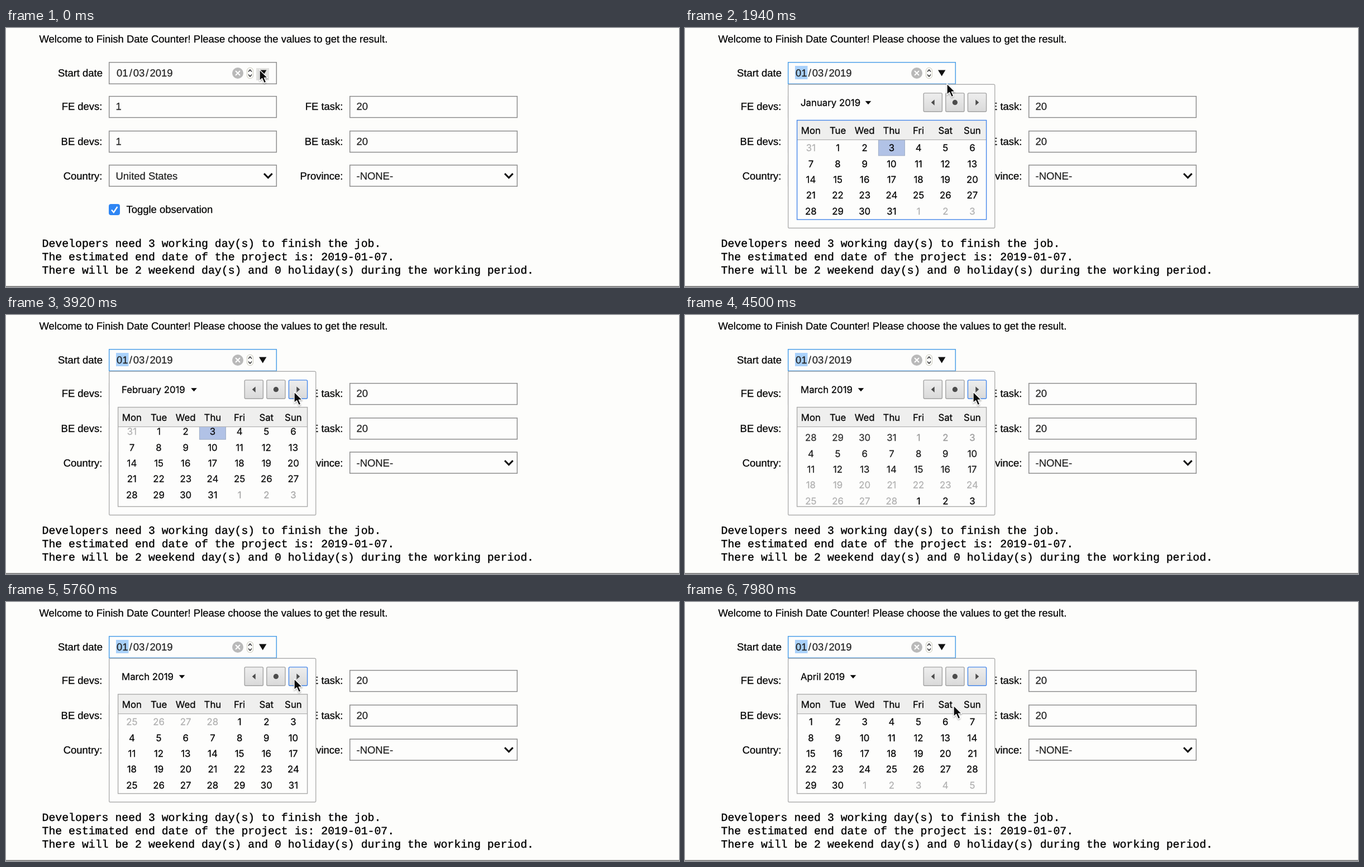
Recreate the animation shown at these times as an HTML page. Size 1205x465 px, loop 8 s.

```html
<!DOCTYPE html>
<html lang="en">
<head>
<meta charset="utf-8">
<title>Finish Date Counter</title>
<style>
  html, body { margin: 0; width: 100%; height: 100%; overflow: hidden; background: #fdfdfb; }
  svg { display: block; width: 1205px; height: 465px; color: #000; }
  text {
    font: 18.44px "Liberation Sans", Arial, sans-serif; text-rendering: geometricPrecision; white-space: pre;
    fill: currentColor; stroke: currentColor; stroke-width: .25px;
  }
  .value { color: #222; }
  .mono text { font: 19.83px "Liberation Mono", "Courier New", monospace; stroke-width: .4px; }
  .popup text { font: 16.8px Inter, sans-serif; }
  .mid { text-anchor: middle; }
  .end { text-anchor: end; }
  .box { fill: #fdfdfc; stroke: #8e8e8e; stroke-width: 1.5; }
  .button { fill: url(#face); stroke: #a3a3a3; stroke-width: 1.4; }
  .chevron { fill: none; stroke: #111; stroke-width: 3; }
</style>
</head>
<body>
<svg id="stage" viewBox="0 0 1205 465">
  <defs>
    <linearGradient id="face" x2="0" y2="1">
      <stop stop-color="#eeeeee"/><stop offset="1" stop-color="#d9d9d9"/>
    </linearGradient>
    <clipPath id="window"><rect x="201" y="201" width="338.5" height="142.5"/></clipPath>
    <filter id="shadow" x="-50%" y="-50%" width="200%" height="200%">
      <feDropShadow dx="0" dy="1.5" stdDeviation="1.3" flood-opacity=".35"/>
    </filter>
  </defs>

  <text x="59.5" y="25.5">Welcome to Finish Date Counter! Please choose the values to get the result.</text>
  <g id="form"></g>

  <rect id="dateBox" class="box" x="184.7" y="61.7" width="299.6" height="38.6"/>
  <rect id="mark" x="197" y="68" width="22.5" height="24" fill="#a9d1fb"/>
  <g class="value">
    <text x="198" y="86.5">01</text><text x="220.7" y="86.5">/</text>
    <text x="227.8" y="86.5">03</text><text x="250.3" y="86.5">/</text>
    <text x="257.4" y="86.5">2019</text>
  </g>
  <circle cx="415" cy="81" r="10" fill="#b9b9b9"/>
  <path d="M411 77l8 8m0-8l-8 8" stroke="#fff" stroke-width="2"/>
  <rect x="431.7" y="71.5" width="10.6" height="19" rx="4.5" fill="#fff" stroke="#c6c6b4"/>
  <path d="M434 78.5l3-3.5 3 3.5m-6 5l3 3.5 3-3.5" fill="none" stroke="#333" stroke-width="1.5"/>
  <rect id="hover" x="448" y="72" width="23" height="22" fill="#e2e2e0"/>
  <path d="M453 75.5h13.4l-6.7 11z" fill="#111"/>

  <rect x="184" y="316" width="20" height="20" rx="4" fill="#2f86f3"/>
  <path d="M189 326.5l3.8 4.5 6.6-10" fill="none" stroke="#fff" stroke-width="2.3"/>
  <text x="215.5" y="332">Toggle observation</text>

  <g class="mono">
    <text x="64.5" y="392.5">Developers need 3 working day(s) to finish the job.</text>
    <text x="64.5" y="416.8">The estimated end date of the project is: 2019-01-07.</text>
    <text x="64.5" y="441">There will be 2 weekend day(s) and 0 holiday(s) during the working period.</text>
  </g>
  <rect y="463.3" width="1205" height="1.7" fill="#777"/>

  <g id="popup" class="popup">
    <rect x="184.7" y="101.2" width="370" height="258" rx="2" fill="#fdfdfc" stroke="#b0b0b0" stroke-width="1.4"/>
    <text id="title" x="207" y="140.3"></text>
    <path id="drop" d="M-5.3-3h10.6l-5.3 6z"/>
    <rect class="button" x="427.2" y="116.9" width="33.2" height="33.4" rx="2"/>
    <rect class="button" x="466.8" y="116.9" width="33.2" height="33.4" rx="2"/>
    <rect id="next" class="button" x="506.4" y="116.9" width="33.2" height="33.4" rx="2"/>
    <path d="M446.7 128.6v10.4l-6-5.2zM520.3 128.6v10.4l6-5.2z" fill="#4c4c4c"/>
    <circle cx="483.4" cy="133.7" r="4.6" fill="#4c4c4c"/>
    <rect x="200.5" y="166" width="339" height="34.5" fill="#efefee"/>
    <path d="M200.5 200.7h339" stroke="#b2b2b2" stroke-width="1.3"/>
    <g id="names"></g>
    <g clip-path="url(#window)"><g id="days">
      <rect x="346.4" y="201.3" width="47" height="27.8" fill="#b1c2e6" stroke="#a0adc6"/>
    </g></g>
    <rect id="frame" x="200.6" y="165.6" width="339" height="178.3" fill="none" stroke-width="1.4"/>
  </g>

  <path id="cursor" d="M0 0V19.8L4.6 15.6L8.2 23.8L11.8 22.2L8.3 14.3H14.4Z" fill="#0a0a0a"
        stroke="#fff" stroke-width="1.3" stroke-linejoin="round" filter="url(#shadow)"/>
</svg>

<script>
const $ = id => document.getElementById(id);
const NS = 'http://www.w3.org/2000/svg';

function add(parent, tag, attrs, text = '') {
  const el = parent.appendChild(document.createElementNS(NS, tag));
  for (const k in attrs) el.setAttribute(k, attrs[k]);
  el.textContent = text;
  return el;
}

function field(label, value, x, y, select) {
  const form = $('form'), base = y + (select ? 26.2 : 25.3);
  add(form, 'text', { class: 'end', x: x - 11.6, y: base }, label);
  add(form, 'rect', { class: 'box', x: x + .7, y: y + .7, width: 299.6, height: 38 });
  add(form, 'text', { class: 'value', x: x + 12.5, y: base }, value);
  if (select) add(form, 'path', { class: 'chevron', d: `M${x + 278} ${y + 15.9}l7.3 7.5 7.3-7.5` });
}
add($('form'), 'text', { class: 'end', x: 173, y: 86.5 }, 'Start date');
field('FE devs:', '1', 184, 122);
field('FE task:', '20', 615, 122);
field('BE devs:', '1', 184, 184.3);
field('BE task:', '20', 615, 184.3);
field('Country:', 'United States', 184, 245.5, true);
field('Province:', '-NONE-', 615, 245.5, true);

// Time is counted in ticks, three per 140 ms.
const LOOP = 8000, OPEN = 8, LEAVE = 38, SCROLL = 19.7, FADE = 67;
const ROW = 28.35, COL = 48.17, ROWS = 18;
const months = [
  { name: 'January 2019', at: 0, row: 0, drop: 328 },
  { name: 'February 2019', at: 79.4, row: 4, drop: 336.5 },
  { name: 'March 2019', at: 88.1, row: 8, drop: 315 },
  { name: 'April 2019', at: 135, row: 13, drop: 301 }
];
const path = [[0, 454, 75], [34, 454, 75], [41, 469, 100], [58, 516, 138], [161, 516, 138], [171, 481, 186]];

const clamp = x => Math.min(1, Math.max(0, x));
const mix = (a, b, p) => a + (b - a) * p;
const inOut = x => x < .5 ? 4 * x ** 3 : 1 - 4 * (1 - x) ** 3;

// CSS "ease"
function ease(x) {
  let lo = 0, hi = 1;
  for (let i = 0; i < 16; i++) {
    const s = (lo + hi) / 2;
    if (.75 * s * (1 - s) + s ** 3 < x) lo = s; else hi = s;
  }
  return .3 * lo * (1 - lo) ** 2 + 3 * lo * lo * (1 - lo) + lo ** 3;
}

const ticks = t => {
  const r = t % 140;
  return Math.floor(t / 140) * 3 + (r < 20 ? 0 : r < 120 ? 1 : 2);
};
const monthAt = n => months.findLastIndex(m => n >= m.at);

// A click during a scroll starts again from the place reached.
function scrollAt(n) {
  let pos = 0;
  months.forEach((m, i) => {
    if (!i || n < m.at) return;
    const until = i < 3 ? Math.min(n, months[i + 1].at) : n;
    pos = mix(pos, m.row, inOut(clamp((until - m.at) / SCROLL)));
  });
  return pos;
}

function firstSeen(row) {
  let n = 0;
  while (row > 4 && n < 171 && scrollAt(n) <= row - 5) n++;
  return n;
}

const cells = [];
for (let row = 0; row < ROWS; row++) {
  const born = firstSeen(row);
  for (let c = 0; c < 7; c++) {
    const date = new Date(Date.UTC(2018, 11, 31 + row * 7 + c));
    const el = add($('days'), 'text',
      { class: 'mid', x: 225.4 + c * COL, y: 221.2 + row * ROW }, date.getUTCDate());
    cells.push({ el, born, month: row || c ? date.getUTCMonth() : -1 });
  }
}
['Mon', 'Tue', 'Wed', 'Thu', 'Fri', 'Sat', 'Sun'].forEach((d, i) =>
  add($('names'), 'text', { class: 'mid', x: 225.4 + i * COL, y: 190 }, d));

// 0 is in the current month, 1 is outside; new rows skip the fade.
function dimness(cell, n) {
  const first = monthAt(cell.born);
  let dim = +(cell.month !== first);
  for (let i = first + 1; i < 4 && n >= months[i].at; i++) {
    const until = i < 3 ? Math.min(n, months[i + 1].at) : n;
    dim = mix(dim, +(cell.month !== i), ease(clamp((until - months[i].at) / FADE)));
  }
  return dim;
}

function cursorAt(n) {
  const i = Math.max(1, path.findIndex(p => n <= p[0]));
  const [a, b] = [path[i - 1], path[i]];
  const x = clamp((n - a[0]) / (b[0] - a[0]));
  const p = i === 3 ? 1 - (1 - x) ** 2 : x * x;
  return [mix(a[1], b[1], p), mix(a[2], b[2], p)];
}

function draw(n) {
  const open = n >= OPEN, now = monthAt(n), month = months[now];
  $('popup').style.display = $('mark').style.display = open ? '' : 'none';
  $('hover').style.display = n < LEAVE ? '' : 'none';
  $('dateBox').style.stroke = open ? '#4da0e8' : '';
  $('title').textContent = month.name;
  $('drop').setAttribute('transform', `translate(${month.drop} 134.3)`);
  $('frame').style.stroke = now ? '#ababab' : '#4788ea';
  $('next').style.stroke = now ? '#4788ea' : '';
  $('days').setAttribute('transform', `translate(0 ${-scrollAt(n) * ROW})`);
  for (const cell of cells) {
    const v = Math.round(176 * dimness(cell, n));
    cell.el.style.color = `rgb(${v},${v},${v})`;
  }
  $('cursor').setAttribute('transform', `translate(${cursorAt(n)})`);
}

const start = performance.now();
function loop() {
  draw(ticks((performance.now() - start) % LOOP));
  requestAnimationFrame(loop);
}
loop();
</script>
</body>
</html>
```
